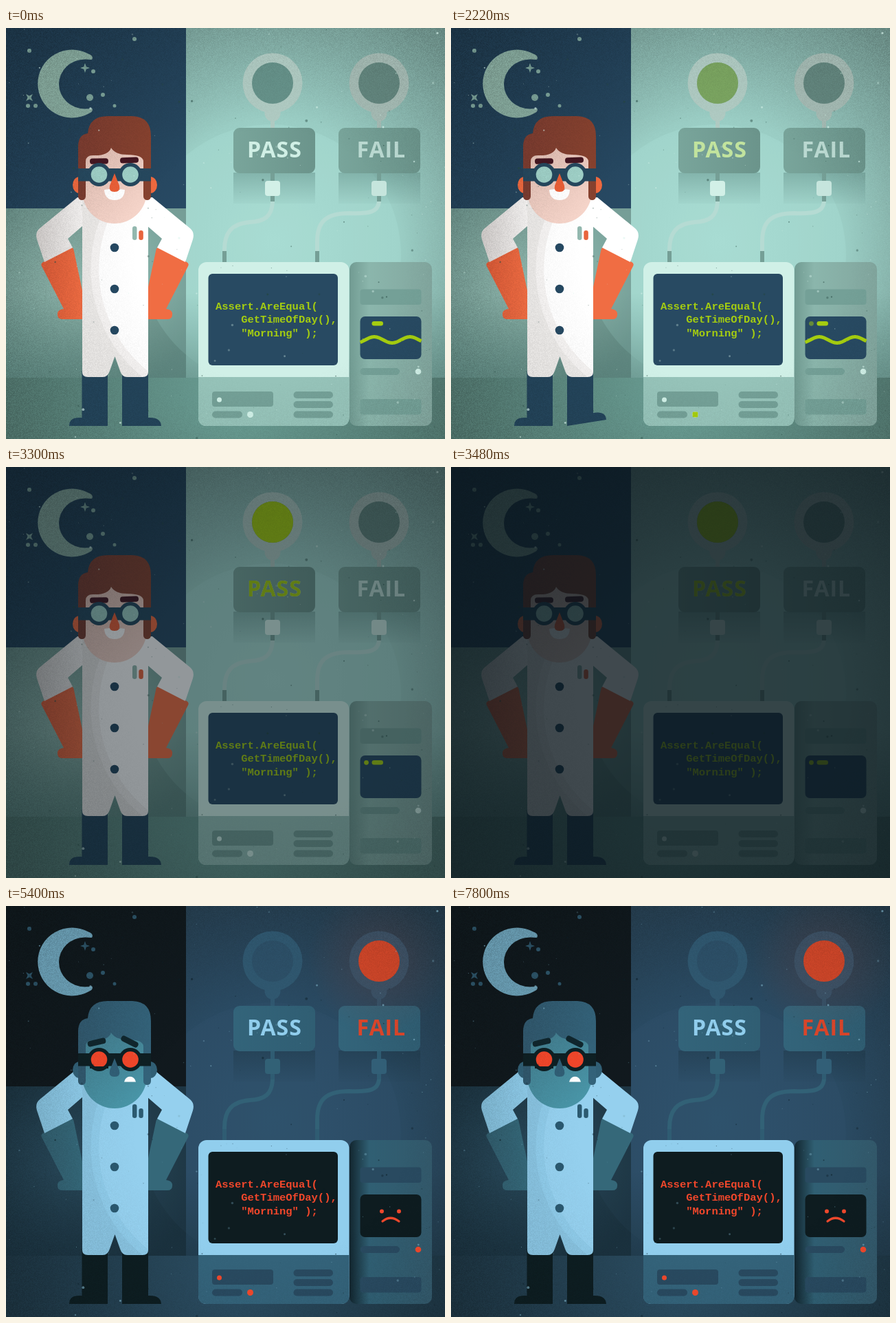
An HTML page with a canvas for the animation above (8040 ms loop, 639x597 px).

```html
<!DOCTYPE html>
<html lang="en">
<head>
<meta charset="utf-8">
<title>Unit test at night</title>
<style>
html, body { margin: 0; width: 100%; height: 100%; overflow: hidden; background: #0a151c; }
#stage { position: relative; width: 639px; height: 597px; overflow: hidden; }
.scene, .scene > *, #shade { position: absolute; left: 0; top: 0; width: 639px; height: 597px; }
#shade { background: #0a151c; }
.sign { font: 700 32px "Open Sans", "Noto Sans", sans-serif; letter-spacing: 1px; }
.code { font: bold 15.5px "Courier New", "Liberation Mono", monospace; white-space: pre; }
</style>
</head>
<body>
<div id="stage">
  <div class="scene" id="day"></div>
  <div class="scene" id="night"></div>
  <div id="shade"></div>
</div>
<script>
const W = 639, H = 597, LOOP = 8040, STEP = 60;

const DAY = {
  id: 'day', head: 0, arms: 0,
  wall: ['#a5d8cf', '#9bcec5', '#6f938c'], left: ['#668b84', '#93bbb1'], floor: ['#6b9f95', '#52776f'],
  sky: ['#1e384b', '#284a64'], moon: '#86a99d', star: '#7ba198', glow: 'rgba(180,232,222,.2)',
  rings: ['#b0cbc3', '#a5bbb4'], bulbs: ['#66928a', '#63867e'], box: ['#79a59b', '#6b948b'],
  signs: ['#d0efe5', '#bbdad2'], drop: '#537f78', plug: ['#d2f0e7', '#c6e5dd'], nub: '#759f96', wire: '#b5dbd3',
  pc: '#d0f0e7', pcLow: '#96c3b9', screen: '#284a62', side: ['#719b92', '#8bb6ac', '#82a69e'], slot: '#74a097',
  led: '#d0f0e7', code: '#a5cd10',
  coat: ['#ffffff', '#f5f3f2', '#ebe9e7'], armDark: '#d2cecc', glove: ['#d95a37', '#f06d43'], button: '#264962', pens: ['#93b8af', '#e8643d'],
  leg: '#24455b', hair: ['#7b3c30', '#87422f'], ear: '#ed693f', skin: ['#dfbdb2', '#f6d5ca'], brow: '#451722',
  rim: '#26485e', lens: '#9fd0c7', nose: '#ea5f37', grain: 48, speck: ['#24463f', '#d9f4ec']
};
const NIGHT = {
  id: 'night', head: 10, arms: -10,
  wall: ['#2d506a', '#2a4a62', '#243947'], left: ['#1a303c', '#2a4b5d'], floor: ['#2c4e63', '#1d3441'],
  sky: ['#10191d', '#11191e'], moon: '#6b9fb5', star: '#2d5468', glow: 'rgba(60,100,125,.10)',
  rings: ['#305870', '#2f526a'], bulbs: ['#2d5068', '#cd4629'], box: ['#33647a', '#305e73'],
  signs: ['#90cdec', '#da462b'], drop: '#1b3341', plug: ['#326176', '#325f77'], nub: '#2f5c72', wire: '#326176',
  pc: '#91ceed', pcLow: '#34637a', screen: '#0e1c20', side: ['#12262f', '#305f73', '#33596b'], slot: '#294a60',
  led: '#ef492d', code: '#f2472b',
  coat: ['#95d0ee', '#8ecae8', '#88c2df'], armDark: '#7fb8d3', glove: ['#315c6c', '#356879'], button: '#2b5970', pens: ['#2c5a70', '#2c5a70'],
  leg: '#0e1e22', hair: ['#31586d', '#34637a'], ear: '#315f75', skin: ['#427b8c', '#4995a7'], brow: '#11272e',
  rim: '#0f2024', lens: '#f1472b', nose: '#315f76', grain: 48, speck: ['#0c1c24', '#7fb3c8']
};

const attrs = o => Object.entries(o).map(([k, v]) => ` ${k}="${v}"`).join('');
const rect = (x, y, w, h, rx, fill, more = {}) =>
  `<rect${attrs({ x, y, width: w, height: h, rx, fill, ...more })}/>`;
const dot = (cx, cy, r, fill, more = {}) => `<circle${attrs({ cx, cy, r, fill, ...more })}/>`;
const path = (d, fill, more = {}) => `<path${attrs({ d, fill, ...more })}/>`;
const line = (d, stroke, width) => path(d, 'none', { stroke, 'stroke-width': width, 'stroke-linecap': 'round' });
const label = (x, y, text, cls, fill) =>
  `<text${attrs({ x, y, class: cls, fill })} xml:space="preserve">${text}</text>`;
const mirror = s => `<g transform="matrix(-1 0 0 1 317 0)">${s}</g>`;
const shift = (y, s) => `<g transform="translate(0 ${y})">${s}</g>`;

function spark(x, y, r, turn = 0) {
  const q = r * .25;
  return `<path transform="translate(${x} ${y}) rotate(${turn})" d="M0 ${-r}L${q} ${-q} ${r} 0 ${q} ${q} 0 ${r} ${-q} ${q} ${-r} 0 ${-q} ${-q}Z"/>`;
}

function gradients(p) {
  const stops = list => list.map(([o, c, a = 1]) => `<stop offset="${o}" stop-color="${c}" stop-opacity="${a}"/>`).join('');
  const lin = (n, list, x2 = 1, y2 = 0) =>
    `<linearGradient id="${p.id}-${n}" x2="${x2}" y2="${y2}">${stops(list)}</linearGradient>`;
  const rad = (n, cx, cy, r, list) =>
    `<radialGradient id="${p.id}-${n}" gradientUnits="userSpaceOnUse" cx="${cx}" cy="${cy}" r="${r}">${stops(list)}</radialGradient>`;
  const two = c => [[0, c[0]], [1, c[1]]];
  const [lit, mid, dim] = p.coat;
  return '<defs>' +
    rad('wall', 390, 310, 400, [[0, p.wall[0]], [.45, p.wall[1]], [1, p.wall[2]]]) +
    rad('left', 110, 375, 170, [[0, p.left[1]], [1, p.left[0]]]) +
    rad('floor', 330, 540, 330, two(p.floor)) +
    lin('sky', two(p.sky), 1, 1) +
    lin('box', two(p.box)) +
    lin('drop', [[0, p.drop, .4], [1, p.drop, .05]], 0, 1) +
    lin('cast', [[0, p.drop, 0], [1, p.drop, .5]], 0, 1) +
    lin('side', [[0, p.side[0]], [.24, p.side[1]], [1, p.side[2]]]) +
    rad('coat', 325, 350, 202, [[0, lit], [.937, lit], [.942, mid], [.995, mid], [1, dim]]) +
    lin('arm', [[0, p.armDark], [1, mid]]) +
    lin('glove', two(p.glove)) +
    lin('hair', two(p.hair)) +
    lin('skin', two(p.skin), .6, 1) +
    rad('heat', 543, 80, 105, [[0, '#d0452a', .14], [1, '#d0452a', 0]]) +
    '</defs>';
}

function room(p, g) {
  return rect(0, 0, W, H, 0, g('wall')) +
    rect(0, 262, 262, 246, 0, g('left')) +
    dot(385, 330, 190, p.glow) +
    rect(0, 0, 262, 262, 0, g('sky')) +
    rect(0, 385, W, 123, 0, g('cast')) +
    rect(0, 508, W, 89, 0, g('floor')) +
    path('M121 38A50 49.5 0 1 0 121 124Q128 121 125 116.5 120 117.5 115 117.5A38 36 0 0 1 115 45.5Q120 45.5 125 46 128 41 121 38Z', p.moon) +
    `<g fill="${p.star}">` + spark(115, 58, 7) + spark(34, 101, 7, 45) +
    [[127, 63, 3], [122, 101, 5], [141, 97, 3], [158, 113, 2.5], [34, 33, 3], [187, 16, 3], [32, 113, 3], [43, 113, 3]]
      .map(([x, y, r]) => dot(x, y, r, p.star)).join('') + '</g>';
}

function lamp(p, g, i) {
  const x = [388, 543][i], left = [331, 484][i], name = ['PASS', 'FAIL'][i];
  const tube = ['M388 250C388 274 376 281 355 282 328 284 318 298 318 322V337',
    'M543 250C543 268 528 270 500 269 465 269 453 282 453 310V337'][i];
  const end = [318, 453][i];
  return rect(left, 210, 119, 45, 0, g('drop')) +
    line(tube, p.wire, 6) +
    rect(end - 3, 324, 6, 16, 0, p.nub) +
    rect(x - 3, 132, 6, 14, 0, p.rings[i]) +
    dot(x, 124, 11.5, p.rings[i]) +
    dot(x, 80, 43.5, p.rings[i]) + dot(x, 80, 30, p.bulbs[i]) +
    rect(left, 145, 119, 66, 9, g('box')) +
    rect(x - 3, 211, 6, 41, 0, p.nub) +
    rect(x - 11, 222, 22, 22, 4, p.plug[i]) +
    label([351, 510.5][i], 187.5, name, 'sign', p.signs[i]);
}

function computer(p, g) {
  const code = ['Assert.AreEqual(', '    GetTimeOfDay(),', '    "Morning" );'];
  return rect(500, 340, 120, 238, 10, g('side')) +
    rect(280, 340, 219.5, 238, 12, p.pc) +
    path('M280 507H499.5V566Q499.5 578 487.5 578H292Q280 578 280 566Z', p.pcLow) +
    rect(294.5, 357, 188.5, 133, 6, p.screen) +
    code.map((s, i) => label(305, 409 + 19.4 * i, s.replace(/ /g, '\u00a0'), 'code', p.code)).join('') +
    rect(300, 528, 89, 22, 4, p.slot) + rect(300, 556.5, 44, 10, 5, p.slot) +
    [528, 542, 556.5].map(y => rect(418.5, y, 57.5, 10, 5, p.slot)).join('') +
    rect(515.5, 379.5, 89, 22.5, 4, p.slot) + rect(515.5, 539, 89, 22.5, 4, p.slot) +
    rect(515.5, 494, 57.5, 10, 5, p.slot) +
    rect(515.5, 419, 89, 62, 7, p.screen) +
    dot(310.5, 540, 3.5, p.led) + dot(355.5, 561.5, 4.5, p.led) + dot(600, 499, 4.3, p.led);
}

function body(p, g) {
  const arm = fill => path('M104 246L49 291Q42 297 45 307L56 340 97 319 90 306 112 287V246Z', fill);
  const glove = fill => path('M52 346Q50 342 54 340L92 319Q97 317 98.5 322L111 381V423H82Q74 423 75 414 76 409 84 408Z', fill);
  const coat = 'M111 246H207V500Q207 507 199 507H176Q169 507 166 498L158.5 477 151 498Q148 507 141 507H119Q111 507 111 500Z';
  return path('M148 498V578H92Q92 566 106 566H110.5V498Z', p.leg) +
    path(foot(0), p.leg, { class: 'foot' }) +
    shift(p.arms, glove(g('glove')) + mirror(glove(p.glove[1])) + arm(g('arm')) + mirror(arm(p.coat[0]))) +
    path(coat, g('coat')) +
    [319, 379, 439].map(y => dot(158, y, 6.3, p.button)).join('') +
    rect(184, 288, 6.5, 20, 3.2, p.pens[0]) + rect(193.3, 294, 6.5, 14, 3.2, p.pens[1]);
}

function head(p, g) {
  const night = p === NIGHT;
  const brow = (x, y, turn) => rect(x - 13.5, y - 4.2, 27, 8.4, 4, p.brow, { transform: `rotate(${turn} ${x} ${y})` });
  const ear = x => `<ellipse cx="${x}" cy="228" rx="10" ry="12" fill="${p.ear}"/>`;
  return ear(107) + ear(210) +
    path('M105 172Q105 155 119 153 121 128 148 128H184Q211 129 211 157V220H105Z', g('hair')) +
    path('M116 193Q117 185 126 185 149 186 153 174 159 184 176 184 200 184 200 194V216Q205 226 205 237A47 47 0 0 1 111 237Q111 226 116 216Z', g('skin')) +
    rect(105, 190, 11, 60, 5.5, p.hair[0]) + rect(200, 190, 11, 60, 5.5, p.hair[1]) +
    (night ? brow(132, 188, -13) + brow(180, 187, 27) : brow(135.5, 193.5, -1) + brow(179.5, 192, -2)) +
    rect(105, 204, 106, 18.5, 0, p.rim) + dot(135.5, 213, 17, p.rim) + dot(181, 213, 17, p.rim) +
    dot(135.5, 213, 11.8, p.lens) + dot(181, 213, 11.8, p.lens) +
    (night
      ? rect(122, 223, 27, 3, 0, p.rim) + path('M172 245.5A8.6 9 0 0 1 189 245.5Z', '#ffffff')
      : [135.5, 181].map(x => dot(x, 213, 12, '#ecc6ba', { class: 'lid' })).join('') +
        path('M143 235Q158 232 173 235 172 250 158 250 144 250 143 235Z', '#ffffff')) +
    path('M158 211L165 229Q167 238 158 238 149 238 151 229Z', p.nose);
}

function foot(lift) {
  const top = 566 - lift;
  return `M169 498V578L226 ${578 - lift}Q225 ${top} 210 ${top + lift * .2}L207 ${top + lift * .25}V498Z`;
}

function extras(p, g) {
  if (p === NIGHT) return dot(543, 80, 105, g('heat')) +
    dot(547, 443.5, 3, p.led) + dot(572, 443.5, 3, p.led) +
    line('M548 458Q559.5 448.5 572 458', p.led, 3.2);
  const lime = '#a5cd10';
  return '<g class="lit">' + dot(388, 80, 30, lime) + label(351, 187.5, 'PASS', 'sign', lime) + '</g>' +
    rect(351.5, 557.5, 8, 8, 2, lime, { class: 'led' }) +
    dot(524.5, 429.3, 3.4, lime, { class: 'ready' }) +
    rect(532.5, 426, 16.5, 6.6, 3.3, lime) +
    path('', 'none', { class: 'wave', stroke: lime, 'stroke-width': 5 });
}

function random(seed) {
  return () => (seed = (seed * 16807) % 2147483647) / 2147483647;
}

// Printed texture: fine grain growing towards the edges, plus scattered specks.
function texture(p) {
  const canvas = document.createElement('canvas');
  canvas.width = W; canvas.height = H;
  const ctx = canvas.getContext('2d'), img = ctx.createImageData(W, H), rnd = random(77);
  for (let y = 0, i = 3; y < H; y++) for (let x = 0; x < W; x++, i += 4) {
    const d = Math.hypot((x - 385) / 390, (y - 330) / 360);
    const edge = Math.min(1, Math.max(0, (d - .5) / .7));
    img.data[i] = rnd() * p.grain * edge;
  }
  ctx.putImageData(img, 0, 0);
  for (let n = 0; n < 190; n++) {
    ctx.globalAlpha = .2 + rnd() * .45;
    ctx.fillStyle = p.speck[rnd() < .5 ? 0 : 1];
    ctx.beginPath();
    ctx.arc(rnd() * W, rnd() * H, .5 + rnd() ** 3 * 1.5, 0, 7);
    ctx.fill();
  }
  return canvas;
}

function build(p) {
  const g = n => `url(#${p.id}-${n})`, box = document.getElementById(p.id);
  box.innerHTML = `<svg viewBox="0 0 ${W} ${H}">` + gradients(p) + room(p, g) + lamp(p, g, 0) + lamp(p, g, 1) +
    computer(p, g) + body(p, g) + shift(p.head, head(p, g)) + extras(p, g) + '</svg>';
  box.append(texture(p));
  return box;
}

const day = build(DAY), night = build(NIGHT), shade = document.getElementById('shade');
const part = c => day.querySelector('.' + c);
const toe = part('foot'), lit = part('lit'), led = part('led'), ready = part('ready'), wave = part('wave');
const lids = day.querySelectorAll('.lid');
const ramp = (t, a, b) => Math.min(1, Math.max(0, (t - a) / (b - a)));

function wavePath(t) {
  let d = '';
  for (let x = 515.5; x <= 604.5; x += 1) {
    const y = 453 - 4.4 * Math.cos(2 * Math.PI * ((x - 536) / 52 - t / 1110));
    d += (d ? 'L' : 'M') + x + ' ' + y.toFixed(2);
  }
  return d;
}

function draw(t) {
  const dark = t >= 3600;
  day.style.visibility = dark ? 'hidden' : 'visible';
  night.style.visibility = dark ? 'visible' : 'hidden';
  shade.style.opacity = dark ? 1 - ramp(t, 3600, 4140) : ramp(t, 3060, 3600);
  if (dark) return;
  toe.setAttribute('d', foot(t < 2880 ? 10.5 * Math.sin(Math.PI * t / 480) ** 2 : 0));
  lit.style.opacity = ramp(t, 2070, 2520);
  led.style.opacity = t < 2880 && t % 960 >= 240 && t % 960 < 720 ? 1 : 0;
  ready.style.opacity = t < 2520 ? .5 - .5 * Math.cos(2 * Math.PI * t / 986.7) : 1;
  wave.style.visibility = t < 2580 ? 'inherit' : 'hidden';
  wave.setAttribute('d', wavePath(t));
  const shut = ramp(t, 1140, 1260) - ramp(t, 1320, 1440);
  lids.forEach(l => {
    l.style.opacity = shut > 0 ? 1 : 0;
    l.style.clipPath = `inset(0 0 ${100 - 100 * shut}% 0)`;
  });
}

const start = performance.now();
function tick() {
  const t = (performance.now() - start) % LOOP;
  draw(Math.floor(t / STEP) * STEP);
  requestAnimationFrame(tick);
}
tick();
</script>
</body>
</html>
```
